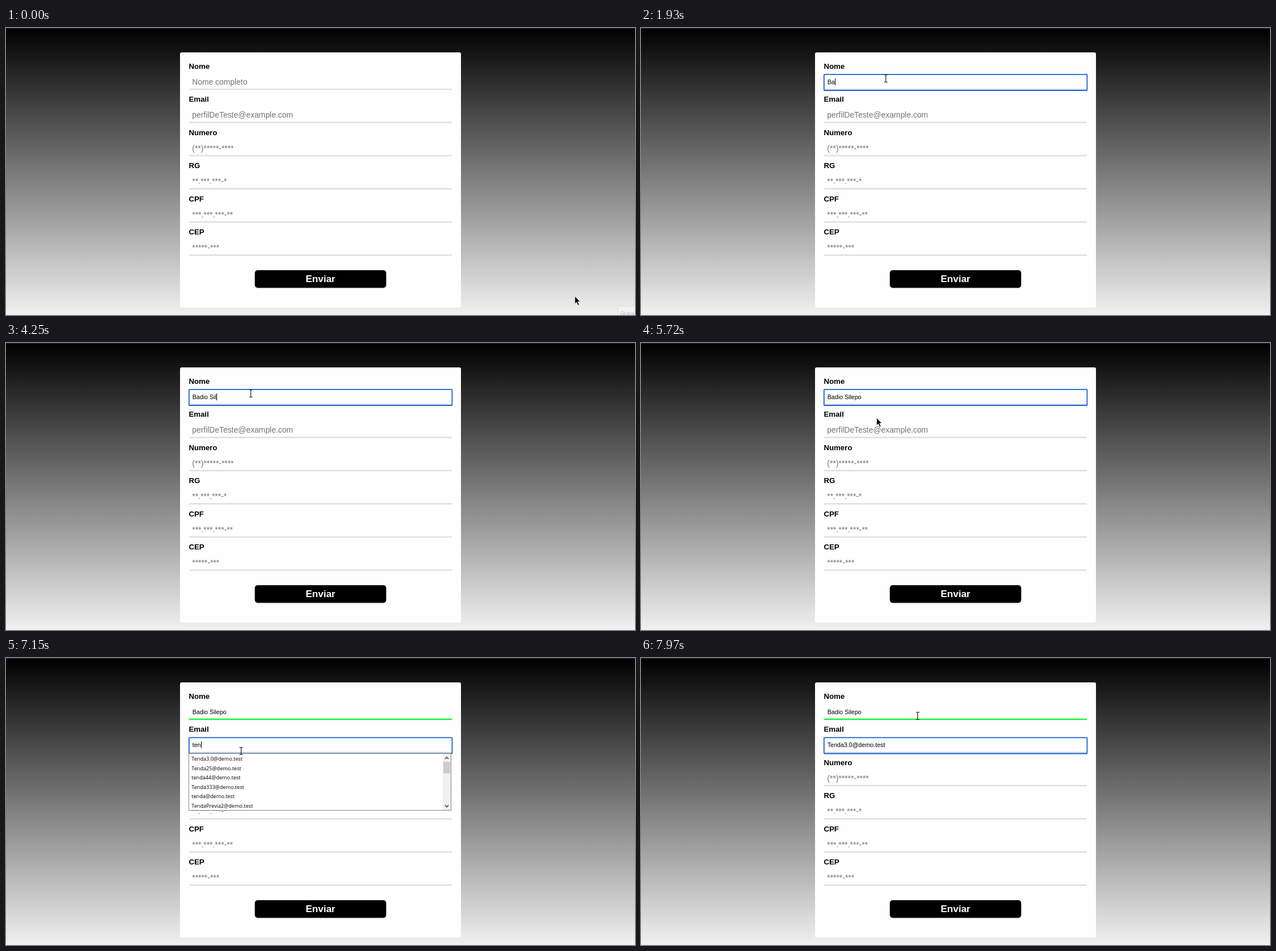
Animation, 1106 px wide and 506 px high, one loop 8000 ms. Source, as an HTML page:

```html
<!DOCTYPE html>
<html lang="pt-BR">
<head>
<meta charset="utf-8">
<title>Formulário</title>
<style>
  html, body { margin: 0; width: 100%; height: 100%; overflow: hidden; }
  svg { display: block; width: 1106px; height: 506px; font-family: "Liberation Sans", Arial, sans-serif; }
  .label { font-size: 13.2px; font-weight: bold; }
  .hint { font-size: 13.87px; fill: #757575; }
  .typed { font-size: 10.67px; }
  .menu text, .tip text { font: 9.1px "Open Sans", "Noto Sans", sans-serif; }
</style>
</head>
<body>
<svg id="stage" viewBox="0 0 1106 506">
  <defs>
    <linearGradient id="sky" x2="0" y2="1">
      <stop stop-color="#000"/><stop offset="1" stop-color="#f1f1f1"/>
    </linearGradient>
  </defs>
  <rect width="1106" height="506" fill="url(#sky)"/>
  <rect width="1106" height="1" fill="#2b2b2b"/>
  <g class="tip" id="tip">
    <rect x="1075.5" y="490.5" width="40" height="30" fill="#f1f1f1" stroke="#dcdcdc"/>
    <text x="1080" y="506" fill="#b8b8b8">Grava</text>
  </g>
  <rect x="306" y="43" width="494" height="450" rx="3" fill="#fefefe"/>
  <g id="fields"></g>
  <rect x="438" y="430" width="230" height="30" rx="5" fill="#dedede"/>
  <rect x="437.5" y="427" width="231" height="31" rx="5"/>
  <text x="553" y="448.4" text-anchor="middle" font-size="17" font-weight="bold" fill="#fff">Enviar</text>
  <rect id="focus" x="321.8" width="462.6" height="28.2" rx="1" fill="none" stroke="#1a60d2" stroke-width="1.8"/>
  <rect id="caret" width="1" height="12"/>
  <g class="menu" id="menu">
    <rect x="321.5" y="168.5" width="461" height="100" fill="#fff" stroke="#858585"/>
    <rect id="hover" x="322" y="169" width="446" height="16.5" fill="#e8e8e8"/>
    <g id="rows"></g>
    <rect x="768" y="169" width="14" height="99" fill="#f0f0f0"/>
    <rect x="769" y="183" width="12" height="20.5" fill="#cdcdcd"/>
    <path d="M772 178l3-3 3 3M772 259.5l3 3 3-3" fill="none" stroke="#404040" stroke-width="1.6"/>
  </g>
  <path id="cursor"/>
</svg>
<script>
const LOOP = 8000, PITCH = 58.5, TEXT_X = 327.7;
const $ = id => document.getElementById(id);

function add(parent, tag, attrs, text = '') {
  const node = document.createElementNS('http://www.w3.org/2000/svg', tag);
  set(node, attrs);
  node.textContent = text;
  return parent.appendChild(node);
}
function set(node, attrs) {
  for (const key in attrs) node.setAttribute(key, attrs[key]);
}
const show = (node, on) => set(node, { visibility: on ? 'visible' : 'hidden' });

const fields = [
  ['Nome', 'Nome completo'],
  ['Email', 'perfilDeTeste@example.com'],
  ['Numero', '(**)*****-****'],
  ['RG', '**.***.***-*'],
  ['CPF', '***.***.***-**'],
  ['CEP', '*****-***'],
].map(([label, hint], i) => {
  const y = i * PITCH, group = $('fields');
  add(group, 'text', { class: 'label', x: 321.4, y: 71.7 + y }, label);
  return {
    line: add(group, 'rect', { x: 322, y: 106.8 + y, width: 462, height: 2.4 }),
    hint: add(group, 'text', { class: 'hint', x: 327.3, y: 99.8 + y }, hint),
    typed: add(group, 'text', { class: 'typed', x: TEXT_X, y: 98.9 + y }),
  };
});

const accounts = ['Tenda3.0', 'Tenda25', 'tenda44', 'Tenda333', 'Tenda4.0', 'tenda', 'TendaPrevia2']
  .map(user => user + '@demo.test');
const rows = Array.from({ length: 6 }, (_, i) =>
  add($('rows'), 'text', { x: 326.3, y: 181.2 + i * 16.5 }));

// Each track is a list of [start, ...values] held until the next start.
const nameTrack = [
  [0, ''], [1330, 'B'], [1930, 'Ba'], [2000, 'Bad'], [2200, 'Badi'], [2400, 'Badio'],
  [2600, 'Badio '], [2930, 'Badio S'], [3130, 'Badio Si'], [3520, 'Badio Sin'],
  [3790, 'Badio Si'], [4250, 'Badio Sil'], [4650, 'Badio Sile'], [4850, 'Badio Silep'],
  [5050, 'Badio Silepo'],
];
const emailTrack = [[0, ''], [6600, 't'], [6800, 'te'], [7000, 'ten'], [7620, accounts[0]]];
const focusTrack = [[0, -1], [610, 0], [6060, 1]];
const caretTrack = [
  [0, false], [610, true], [1130, false], [1330, true], [1660, false], [1930, true],
  [5450, false], [6060, true], [7420, false],
];
const cursorTrack = [
  [0, 'arrow', 1000, 473], [70, 'arrow', 850, 372], [140, 'arrow', 670, 250],
  [200, 'beam', 520, 150], [270, 'arrow', 446, 112], [340, 'beam', 430, 89],
  [5720, 'arrow', 414, 132], [5790, 'arrow', 413, 171], [5990, 'beam', 413, 159],
  [7150, 'beam', 413, 164], [7290, 'arrow', 412, 174], [7490, 'arrow', 412, 178],
  [7690, 'beam', 370, 150], [7790, 'arrow', 300, 112], [7850, 'beam', 390, 92],
  [7970, 'beam', 486, 102],
];
const at = (track, t) => track.findLast(step => step[0] <= t).slice(1);

const cursors = {
  arrow: { d: 'M.3 0V13.2L3.2 10.4 5.6 15.8 7.7 14.9 5.4 9.6H9.4Z', fill: '#000', stroke: '#fff', 'stroke-width': .6 },
  beam: { d: 'M-2.5-6.5H-.8L.5-5.6 1.8-6.5H3.5M.5-5.6V5.6M-2.5 6.5H-.8L.5 5.6 1.8 6.5H3.5', fill: 'none', stroke: '#111', 'stroke-width': 1.1 },
};

function draw(t) {
  const values = [at(nameTrack, t)[0], at(emailTrack, t)[0]];
  const [active] = at(focusTrack, t);
  fields.forEach(({ line, hint, typed }, i) => {
    const value = values[i] || '';
    typed.textContent = value.trimEnd();
    show(hint, !value);
    set(line, { fill: i === 0 && active === 1 ? '#12f532' : '#dfdfdf' });
  });

  show($('focus'), active >= 0);
  show($('caret'), at(caretTrack, t)[0]);
  if (active >= 0) {
    const space = values[active].endsWith(' ') ? 2.96 : 0;
    const width = values[active] ? fields[active].typed.getComputedTextLength() + space : 0;
    set($('focus'), { y: 81.8 + active * PITCH });
    set($('caret'), { x: Math.round(TEXT_X + width), y: Math.floor(89 + active * PITCH) });
  }

  const open = t >= 6600 && t < 7620;
  $('menu').style.display = open ? '' : 'none';
  show($('hover'), t >= 7290);
  const matches = t < 7000 ? accounts : accounts.filter((_, i) => i !== 4);
  rows.forEach((row, i) => row.textContent = matches[i]);

  show($('tip'), t < 340);
  const [shape, x, y] = at(cursorTrack, t);
  set($('cursor'), { ...cursors[shape], transform: `translate(${x} ${y})` });
}

function frame() {
  draw(performance.now() % LOOP);
  requestAnimationFrame(frame);
}
frame();
</script>
</body>
</html>
```
